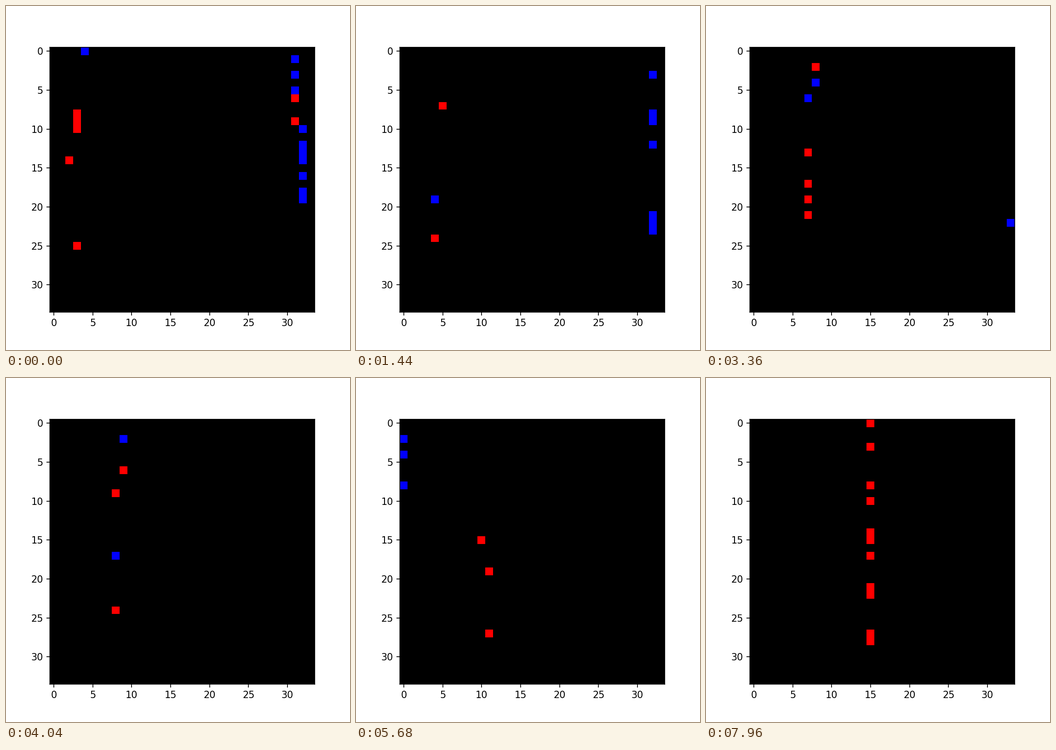
These frames come from a looping animation (748 by 748 pixels, 8 s). A matplotlib script:

```python
import numpy as np
import matplotlib.pyplot as plt
from matplotlib.animation import FuncAnimation

SIZE, FRAMES, STEP = 34, 200, 40
RED, BLUE = 0, 2


def put(img, x, y, channel):
    """Light one cell; both polarities together give magenta."""
    img[y, int(np.clip(round(x), 0, SIZE - 1)), channel] = 1


def main_edge(img, t, rng):
    """Slightly leaning edge that drifts to the right and speeds up."""
    last = 26 if t < 1.7 else 27 if t < 5.9 else 28
    chance = 0.25 * rng.uniform(0.6, 1.4)
    blue_bias = 0 if t < 5 else -1
    phase = rng.uniform(0, 2 * np.pi)
    base = 2.5 + 1.13 * t + 0.054 * t**2
    lean = np.interp(t, [6.6, 8], [1.4, 0.2])
    for y in range(last + 1):
        if rng.random() < chance:
            x = base + lean * max(0, 1 - y / 10) + rng.uniform(-0.4, 0.4)
            blue = np.sin(y / 3 + phase) + blue_bias > 0.1
            put(img, x, y, BLUE if blue else RED)


def right_edge(img, t, rng):
    """Blue edge that leaves through the right side."""
    if t > 5.04:
        return
    chance = max(0.03, 0.45 * (1 - t / 3.2))
    base = 30.4 + 0.9 * t
    lean = 1.8 * max(0, 1 - t / 2)
    for y in range(1, 24):
        if rng.random() < chance:
            x = base + lean * min(1, y / 10) + rng.uniform(-0.3, 0.3)
            red = t < 0.8 and rng.random() < 0.15
            put(img, x - red, y, RED if red else BLUE)


def late_edge(img, t, rng):
    """Faint blue edge that enters at the upper left."""
    if t < 4.24:
        return
    base = 2.1 * max(0, t - 6.6)
    for y in range(9):
        if rng.random() < 0.18:
            put(img, base, y, BLUE)


def centre(img, t, rng):
    """Short flash in the middle, otherwise single sparks."""
    if 2.55 < t < 2.65:
        for y in (13, 14):
            for x in range(31 - y, 22):
                put(img, x, y, RED)
            for x in range(19, 34 - y):
                put(img, x, y, BLUE)
    elif rng.random() < 0.15:
        x = rng.integers(18, 21 if t > 7.5 else 22)
        put(img, x, rng.integers(12, 15), BLUE if t < 5.5 else RED)


def cells(frame):
    img = np.zeros((SIZE, SIZE, 3))
    t = frame * STEP / 1000
    rng = np.random.default_rng(frame)
    for part in (main_edge, right_edge, late_edge, centre):
        part(img, t, rng)
    return img


fig, ax = plt.subplots(figsize=(5, 5), dpi=149.6)
picture = ax.imshow(cells(0), interpolation="nearest")
for spine in ax.spines.values():
    spine.set_snap(False)


def update(frame):
    picture.set_data(cells(frame))
    return (picture,)


anim = FuncAnimation(fig, update, frames=FRAMES, interval=STEP, repeat=True,
                     repeat_delay=0)
plt.show()
```
